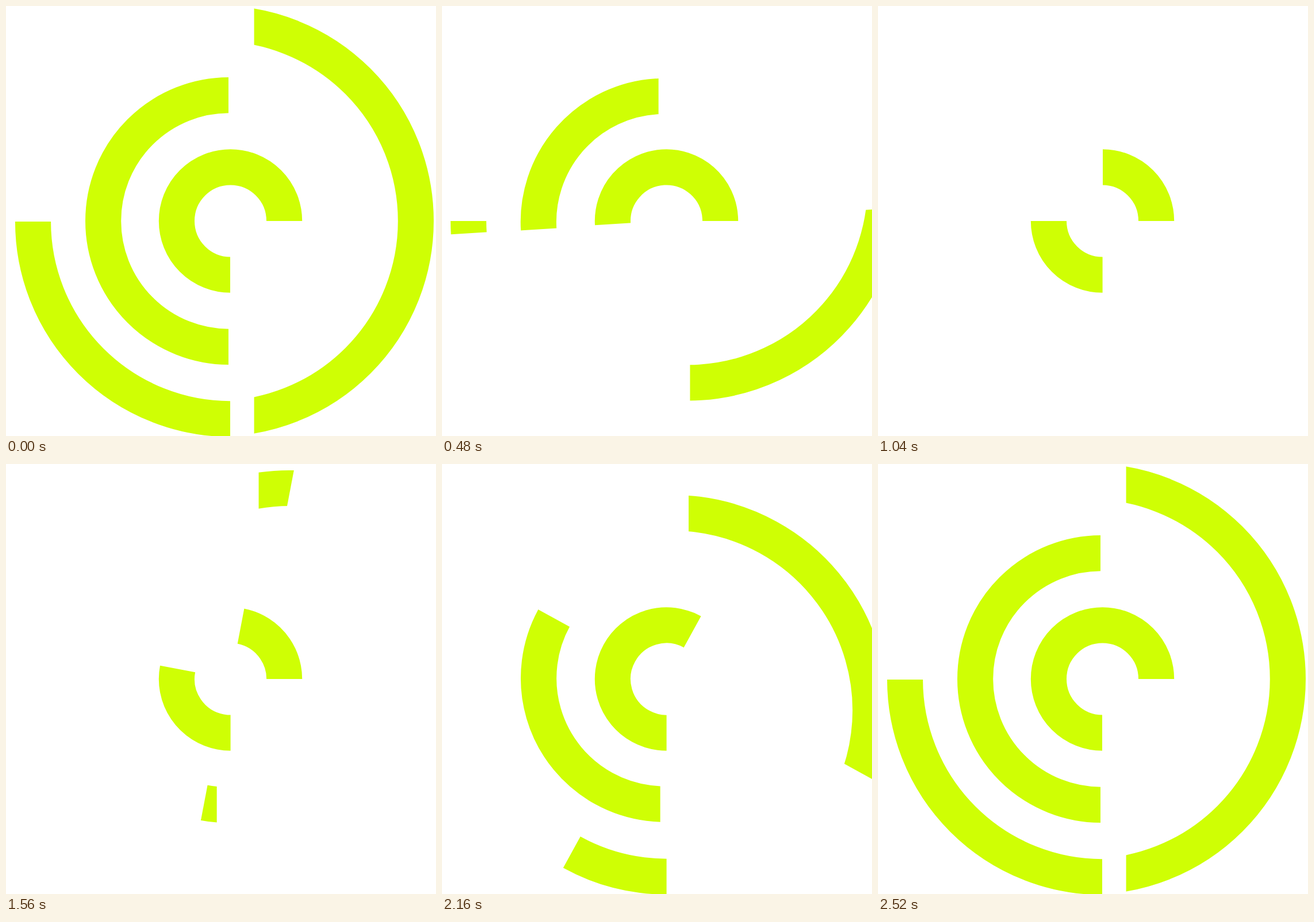
These frames come from a looping animation (748 by 748 pixels, 5040 ms). An HTML page:

```html
<!DOCTYPE html>
<html lang="en">
<head>
<meta charset="utf-8">
<title>Turning rings</title>
<style>
  html, body { margin: 0; width: 100%; height: 100%; overflow: hidden; background: #fff; }
  svg { display: block; width: 100%; height: 100%; }
  circle { fill: none; stroke: #cfff04; }
</style>
</head>
<body>
<svg id="stage" viewBox="0 0 748 748"></svg>
<script>
const LOOP = 5040, STEP = 40, SPEED = 0.18;
const FAR = 2000;
const stage = document.getElementById('stage');

const rect = (x0, y0, x1, y1) => `M${x0} ${y0}H${x1}V${y1}H${x0}Z`;
const leftOf = x => rect(-FAR, -FAR, x, FAR);
const rightOf = x => rect(x, -FAR, FAR, FAR);
const lowerLeft = (x, y) => rect(-FAR, y, x, FAR);
const allButLowerRight = (x, y) => `M${-FAR} ${-FAR}H${FAR}V${y}H${x}V${FAR}H${-FAR}Z`;

// Each ring is cut to `shape`, turned about `pivot` and seen through `view`,
// which may slide as k goes 0 to 1 and back.
const rings = [
  { c: [390.5, 374], r: [62.5, 124.7], pivot: [390.5, 374],
    shape: allButLowerRight(390, 374), view: () => allButLowerRight(390.6, 374) },
  { c: [388, 374], r: [187.8, 250], pivot: [386.4, 374.2],
    shape: leftOf(387), view: k => leftOf(387 - 21.6 * k) },
  { c: [390.3, 375], r: [312.2, 374.4], pivot: [390.3, 374],
    shape: lowerLeft(390, 375), view: () => lowerLeft(390.6, 374) },
  { c: [369.3, 374], r: [312.5, 374.7], pivot: [431.6, 374],
    shape: rightOf(431.6), view: k => rightOf(423 + 17.6 * k) }
];

stage.innerHTML = rings.map(({ c, r, shape }, i) => `
  <clipPath id="view${i}"><path/></clipPath>
  <clipPath id="shape${i}"><path d="${shape}"/></clipPath>
  <g clip-path="url(#view${i})">
    <g id="ring${i}" clip-path="url(#shape${i})">
      <circle cx="${c[0]}" cy="${c[1]}" r="${(r[0] + r[1]) / 2}" stroke-width="${r[1] - r[0]}"/>
    </g>
  </g>`).join('');

rings.forEach((ring, i) => {
  ring.window = stage.querySelector(`#view${i} path`);
  ring.group = stage.querySelector(`#ring${i}`);
});

// Two half turns of one second each, with a rest after each.
function angleAt(t) {
  const turn = start => Math.min(180, Math.max(0, (t - start) * SPEED));
  return (turn(0) + turn(1500)) % 360;
}

function draw(time) {
  const t = Math.floor((time % LOOP) / STEP) * STEP;
  const angle = angleAt(t);
  const k = Math.min(angle, 360 - angle) / 180;
  for (const { window, group, pivot, view } of rings) {
    window.setAttribute('d', view(k));
    group.setAttribute('transform', `rotate(${angle} ${pivot[0]} ${pivot[1]})`);
  }
}

let start;
function tick(now) {
  start ??= now;
  draw(now - start);
  requestAnimationFrame(tick);
}
draw(0);
requestAnimationFrame(tick);
</script>
</body>
</html>
```
